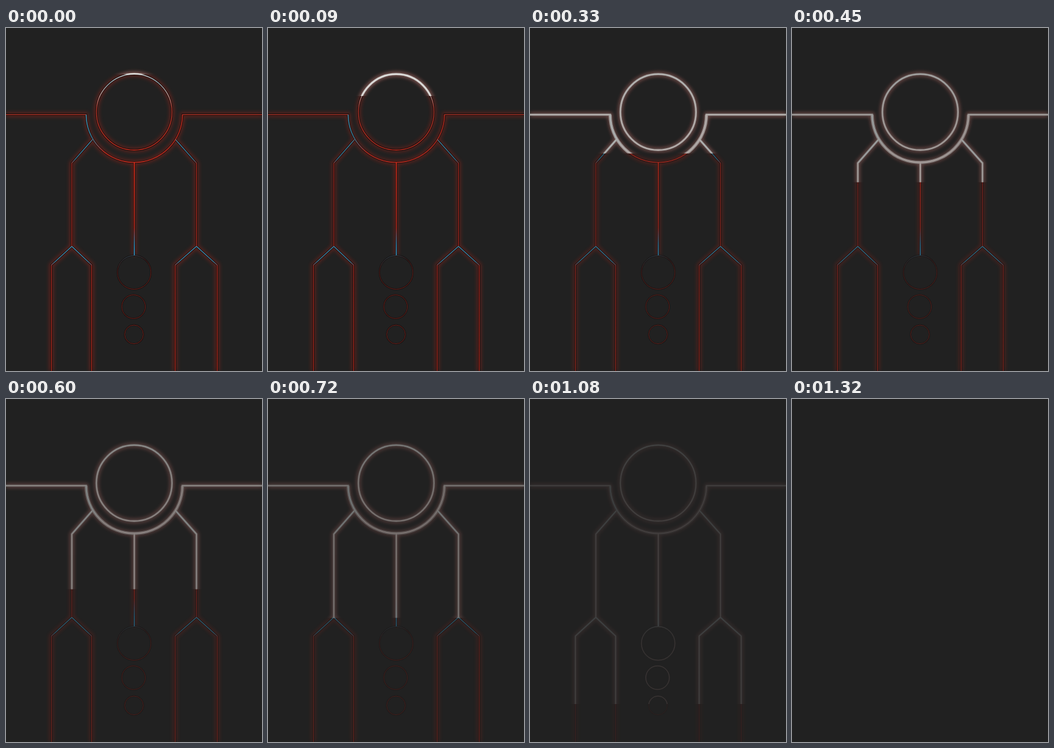
These frames come from a looping animation (420x560 px, 4470 ms). An HTML page:

```html
<!DOCTYPE html>
<html lang="en">
<head>
<meta charset="utf-8">
<title>Energy lines</title>
<style>
  html, body { margin: 0; height: 100%; overflow: hidden; background: #212121; }
  svg { display: block; width: 420px; height: 560px; }
  g, path, circle { fill: none; }
  .soft { filter: blur(3px); }
  .edge { filter: blur(.6px); }
</style>
</head>
<body>
<svg viewBox="0 0 420 560">
  <defs>
    <linearGradient id="ringInk" gradientUnits="userSpaceOnUse" x1="0" y1="75" x2="0" y2="200">
      <stop offset="0" stop-color="#e8eef0"/>
      <stop offset=".12" stop-color="#8fb3bd"/>
      <stop offset=".28" stop-color="#c9a09a"/>
      <stop offset=".45" stop-color="#b8382c"/>
      <stop offset="1" stop-color="#d8301f"/>
    </linearGradient>
    <linearGradient id="arcInk" gradientUnits="userSpaceOnUse" x1="131" y1="150" x2="165" y2="200">
      <stop offset="0" stop-color="#3a93b4"/>
      <stop offset=".45" stop-color="#33809c"/>
      <stop offset="1" stop-color="#b52a1e"/>
    </linearGradient>
    <linearGradient id="limbInk" gradientUnits="userSpaceOnUse" x1="0" y1="180" x2="0" y2="560">
      <stop offset="0" stop-color="#7d5c5c"/>
      <stop offset=".02" stop-color="#3a8fb0"/>
      <stop offset=".09" stop-color="#2f7d9c"/>
      <stop offset=".11" stop-color="#a82a20"/>
      <stop offset=".463" stop-color="#a82a20"/>
      <stop offset=".465" stop-color="#3a9cc4"/>
      <stop offset=".53" stop-color="#3a8aac"/>
      <stop offset=".55" stop-color="#a82a20"/>
      <stop offset="1" stop-color="#b52b1e"/>
    </linearGradient>
    <linearGradient id="stemInk" gradientUnits="userSpaceOnUse" x1="0" y1="219" x2="0" y2="371">
      <stop offset="0" stop-color="#e8301c"/>
      <stop offset=".7" stop-color="#c22b1e"/>
      <stop offset=".88" stop-color="#2f8db8"/>
      <stop offset="1" stop-color="#35a4d8"/>
    </linearGradient>
    <linearGradient id="beadInk" gradientUnits="userSpaceOnUse" x1="185" y1="372" x2="200" y2="426">
      <stop offset="0" stop-color="#3a7c92"/>
      <stop offset=".35" stop-color="#6b2420"/>
      <stop offset="1" stop-color="#a02a20"/>
    </linearGradient>

    <circle id="ring" cx="210.3" cy="137.3" r="62"/>
    <path id="rails" d="M0 141.5H131.5V146M420 141.5H289.5V146"/>
    <path id="arc" d="M131.5 141.5A79 78 0 0 0 289.5 141.5"/>
    <path id="limbs" d="M142 182L108 220.5V356.5L74.5 387V560M108 356.5L140.5 387V560M278 182L312.5 220.5V356.5L277.5 387V560M312.5 356.5L346.5 387V560"/>
    <path id="stem" d="M210.5 219V371"/>
    <g id="beads">
      <circle cx="210.3" cy="399" r="27.5"/>
      <circle cx="209.3" cy="455" r="19.3"/>
      <circle cx="210" cy="500.3" r="15.3"/>
    </g>
    <g id="frame">
      <use href="#ring"/><use href="#rails"/><use href="#arc"/><use href="#limbs"/><use href="#stem"/>
    </g>
    <clipPath id="wipe"><rect id="cover" width="420" height="0"/></clipPath>
  </defs>

  <g id="scene">
    <g class="soft" stroke="#d02818" stroke-width="7" opacity=".36"><use href="#frame"/></g>
    <g class="edge" stroke="#0c0808" stroke-width="3.6" opacity=".65"><use href="#frame"/></g>
    <use href="#beads" stroke="#120c0c" stroke-width="2.4" opacity=".8"/>
    <g stroke-width="1.2">
      <use href="#ring" stroke="url(#ringInk)"/>
      <use href="#rails" stroke="#c93a2c"/>
      <use href="#arc" stroke="url(#arcInk)" stroke-width="1.5"/>
      <use href="#limbs" stroke="url(#limbInk)"/>
      <use href="#stem" stroke="url(#stemInk)" stroke-width="1.5"/>
      <use href="#beads" stroke="url(#beadInk)" stroke-width=".8" opacity=".8"/>
    </g>
    <g clip-path="url(#wipe)">
      <g class="soft" stroke="#fff" stroke-width="6" opacity=".3"><use href="#frame"/></g>
      <g id="body" class="edge" stroke="#f4f4f0">
        <use href="#frame" stroke-width="3.4"/>
        <use href="#arc" stroke-width="5"/>
        <use href="#beads" stroke-width="2"/>
      </g>
      <g stroke="#f2efec" opacity=".75">
        <use href="#frame" stroke-width="1.4"/>
        <use href="#beads" stroke-width=".8" opacity=".6"/>
      </g>
    </g>
  </g>
</svg>
<script>
const LOOP = 4470, STEP = 30, END = 1320;
const el = id => document.getElementById(id);
const scene = el('scene'), cover = el('cover'), body = el('body');

function draw(now) {
  let t = Math.floor(now % LOOP / STEP) * STEP;
  if (t > 1080) t = t < 1170 ? 1080 : t < 1260 ? 1170 : t < END ? 1260 : END;
  const fade = Math.max(0, 1 - t / 1300);
  scene.setAttribute('opacity', fade);
  body.setAttribute('opacity', .2 + .65 * fade);
  cover.setAttribute('height', 75.8 + .391 * t);
}

const start = performance.now();
function tick() {
  draw(performance.now() - start);
  requestAnimationFrame(tick);
}
tick();
</script>
</body>
</html>
```
